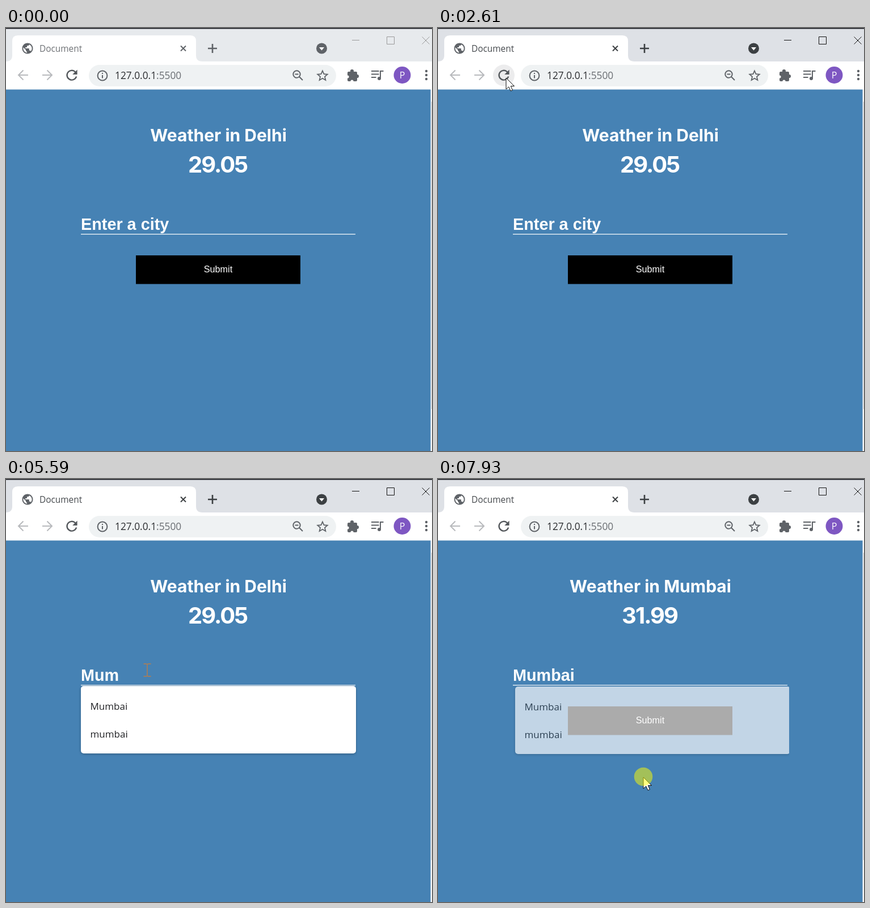
Write an HTML page that moves like this. It is 751 px wide and 746 px high and loops after 8000 ms.

```html
<!DOCTYPE html>
<html lang="en">
<head>
<meta charset="utf-8">
<title>Weather form</title>
<style>
  html, body { margin: 0; width: 100%; height: 100%; overflow: hidden; }
  svg { display: block; width: 751px; height: 746px; }
  svg { --strip: #e7eaed; --ctl: #9a9a9a; --ink: #5f6368; --title: #6e7175; }
  svg.active { --strip: #dee1e6; --ctl: #111; --ink: #3c4043; --title: #45494d; }
  .ui { font-family: "Open Sans", "Noto Sans", sans-serif; }
  .head { font-family: Inter, "Open Sans", sans-serif; font-weight: 700; fill: #fff; text-anchor: middle; }
  .arial { font-family: "Liberation Sans", Arial, sans-serif; }
  .line { fill: none; stroke: #5f6368; stroke-width: 2; }
  .off { display: none; }
  #list text { font-size: 17px; font-weight: 500; fill: #202124; }
  #list .box { filter: drop-shadow(0 1px 2px rgba(0, 0, 0, .3)); }
</style>
</head>
<body>
<svg id="stage" viewBox="0 0 751 746">
  <!-- tab strip -->
  <rect width="751" height="60" fill="var(--strip)"/>
  <rect width="751" height="1.5" fill="#14161c"/>
  <path d="M0 59Q11 59 11 48V23Q11 13 21 13H325Q335 13 335 23V48Q335 59 346 59Z" fill="#fff"/>
  <g id="globe" transform="translate(26.6 24.6) scale(.95)">
    <path fill="#5f6368" d="M12 2C6.48 2 2 6.48 2 12s4.48 10 10 10 10-4.48 10-10S17.52 2 12 2zm-1 17.93c-3.95-.49-7-3.85-7-7.93 0-.62.08-1.21.21-1.79L9 15v1c0 1.1.9 2 2 2zm6.9-2.54c-.26-.81-1-1.39-1.9-1.39h-1v-3c0-.55-.45-1-1-1H8v-2h2c.55 0 1-.45 1-1V7h2c1.1 0 2-.9 2-2v-.41c2.93 1.19 5 4.06 5 7.41 0 2.08-.8 3.97-2.1 5.39z"/>
  </g>
  <path id="spinner" d="M33 29Q35.5 27 39 27" fill="none" stroke="#b9c3de" stroke-width="2"/>
  <text class="ui" x="59" y="41.5" font-size="15.4" fill="var(--title)">Document</text>
  <path d="M308 31.5l9 9m0-9l-9 9" stroke="var(--ink)" stroke-width="2"/>
  <path d="M356 36h16m-8-8v16" stroke="var(--ink)" stroke-width="2.6"/>
  <circle cx="556.5" cy="36" r="9.5" fill="var(--ink)"/>
  <path d="M552 34h9l-4.5 5.5z" fill="#fff"/>
  <path d="M610 21.5h13M671.5 15.5h13v13h-13zM733.5 15.5l13 13m0-13l-13 13" fill="none" stroke="var(--ctl)"/>

  <!-- toolbar -->
  <rect y="59" width="751" height="50" fill="#fff"/>
  <circle id="halo" cx="116" cy="83.5" r="19"/>
  <g class="line" style="stroke:#b8babd">
    <path d="M39 83H22m8.5-8.5L22 83l8.5 8.5"/>
    <path d="M64 83h17m-8.5-8.5L81 83l-8.5 8.5"/>
  </g>
  <path transform="translate(101.6 68.8) scale(1.2)" fill="#54585c" d="M17.65 6.35A8 8 0 1 0 19.73 14h-2.08A6 6 0 1 1 12 6c1.66 0 3.14.69 4.22 1.78L13 11h7V4z"/>
  <rect x="146" y="65" width="436" height="38" rx="19" fill="#eff2f3"/>
  <g class="line">
    <circle cx="170" cy="84" r="8.4"/>
    <path d="M170 83v5.5m0-9.5v2"/>
    <circle cx="512.5" cy="81.5" r="6.2"/>
    <path d="M517 86l6 6M509.5 81.5h6"/>
    <path d="M558 75.500l2.500 5.700 6.200.6-4.700 4.100 1.400 6.100-5.400-3.200-5.400 3.200 1.400-6.100-4.700-4.100 6.200-.6z" stroke-width="1.8"/>
    <path d="M644 76h13.500m-13.500 5.500h13.500m-13.500 5.500h8.500M660 89V76h5.500"/>
  </g>
  <circle cx="658" cy="89" r="3" fill="#5f6368"/>
  <text class="ui" x="192" y="90" font-size="17.3" fill="#2b2d30">127.0.0.1<tspan fill="#6a6e73">:5500</tspan></text>
  <g fill="#5f6368">
    <rect x="602" y="77" width="17" height="17" rx="2"/>
    <circle cx="610" cy="76" r="3.100"/>
    <circle cx="619" cy="85" r="3.100"/>
    <circle cx="602" cy="86" r="2.600" fill="#fff"/>
    <circle cx="610" cy="94" r="2.600" fill="#fff"/>
    <circle cx="741" cy="76" r="2.200"/>
    <circle cx="741" cy="83" r="2.200"/>
    <circle cx="741" cy="90" r="2.200"/>
  </g>
  <circle cx="698.500" cy="83" r="15" fill="#7e57c2"/>
  <text class="ui" x="698.500" y="89" font-size="16" fill="#fff" text-anchor="middle">P</text>

  <!-- page -->
  <rect y="108.500" width="751" height="638" fill="#f4f5f6"/>
  <rect y="108.500" width="748.500" height="638" fill="#4682b4"/>
  <path d="M750.500 130V672" stroke="#c4c6c8"/>
  <g id="page">
    <text id="heading" class="head" x="374.500" y="200" font-size="30"></text>
    <text id="temp" class="head" x="373" y="254.500" font-size="40" letter-spacing="-2"></text>
    <rect x="132" y="363" width="484" height="1.200" fill="#fff"/>
    <text id="value" class="arial" x="132" y="356" font-size="28.800" font-weight="700" fill="#fff"></text>
    <rect id="caret" y="330" width="1" height="33" fill="#fff"/>
    <g id="preview">
      <rect x="132" y="330.500" width="484" height="34" fill="#e8f0fe"/>
      <text class="arial" x="132" y="356" font-size="16" fill="#111">mumbai</text>
    </g>
    <rect x="229" y="401" width="290" height="50.500"/>
    <text class="arial" x="374" y="431" font-size="16.200" fill="#fff" text-anchor="middle">Submit</text>
  </g>
  <clipPath id="edge"><rect x="120" y="360" width="499" height="330"/></clipPath>
  <g clip-path="url(#edge)"><g id="list" class="ui"></g></g>

  <!-- pointer -->
  <path id="arrow" d="M0 0V20L4.800 15.800 8 23 11.400 21.500 8.300 14.500H14.500Z" fill="#fff" stroke="#111"/>
  <path id="beam" d="M-6.500-11H-1.500L0-10 1.500-11H6.500M0-10V10M-6.500 11H-1.500L0 10 1.500 11H6.500" fill="none" stroke="#b97d4b" stroke-width="1.400"/>
  <circle id="dot" r="16.300" fill="#ff0" fill-opacity=".5"/>
</svg>
<script>
const LOOP = 8000;
const $ = id => document.getElementById(id);
const all = ["Mumbai", "Delhi", "mumbai", "adwdqwa", "adwdaw", "sfwefwef"];
const matches = ["Mumbai", "mumbai"];

// Each step changes only the named parts of the state.
const start = {
  active: false, arrow: null, beam: null, dot: null, halo: "none", loading: false, page: true,
  city: "Delhi", temp: "29.05", value: "Enter a city", caret: false, preview: false,
  list: null, fade: false, row: -1
};
const steps = [
  [270, { arrow: [558, 580] }],
  [430, { arrow: [470, 470] }],
  [590, { arrow: null, beam: [236, 337] }],
  [1050, { arrow: [225, 300], beam: null }],
  [1200, { arrow: [200, 230] }],
  [1360, { arrow: [165, 150] }],
  [1510, { arrow: [135, 105], halo: "#f1f1f2" }],
  [1670, { arrow: [120, 88], halo: "#ececed" }],
  [1820, { active: true, dot: [120, 87], halo: "#e2e3e4" }],
  [1980, { halo: "#dadbdc" }],
  [2130, { dot: null, loading: true }],
  [2290, { page: false }],
  [2450, { page: true, loading: false, halo: "#e2e3e4" }],
  [2610, { halo: "#ececed" }],
  [2780, { arrow: [150, 140], halo: "none" }],
  [2930, { arrow: [205, 240] }],
  [3080, { arrow: [245, 312] }],
  [3250, { arrow: null, beam: [249, 337] }],
  [3400, { dot: [246, 336], caret: true }],
  [3560, { list: all, fade: true }],
  [3710, { fade: false }],
  [3860, { dot: null }],
  [4180, { value: "M", fade: true }],
  [4350, { list: matches, fade: false }],
  [4640, { value: "Mu" }],
  [4960, { value: "Mum" }],
  [5590, { caret: false }],
  [6050, { value: "Mumb", caret: true }],
  [6200, { value: "Mumba" }],
  [6370, { value: "Mumbai" }],
  [6850, { caret: false, city: "Mumbai", temp: "31.99" }],
  [7480, { beam: null, arrow: [324, 471], preview: true, row: 1 }],
  [7630, { arrow: [345, 500], preview: false, row: -1 }],
  [7780, { arrow: [362, 526], dot: [362, 525] }],
  [7930, { fade: true }]
];

const show = (id, on) => $(id).classList.toggle("off", !on);

function place(id, at) {
  show(id, at);
  if (at) $(id).setAttribute("transform", `translate(${at})`);
}

function drawList({ list, fade, row }) {
  show("list", list);
  if (!list) return;
  const rowH = 48.6, top = 376;
  const hover = row < 0 ? "" :
    `<rect x="132" y="${top + row * rowH}" width="485" height="${rowH}" fill="#e7e8e7"/>`;
  const items = list.map((name, i) => `<text x="148.5" y="${407 + i * rowH}">${name}</text>`);
  $("list").innerHTML =
    `<rect class="box" x="132" y="365" width="485" height="${list.length * rowH + 21.8}" rx="5" fill="#fff"/>` +
    hover + items.join("");
  $("list").setAttribute("opacity", fade ? 0.67 : 1);
  $("list").setAttribute("transform", fade ? "translate(4 1)" : "");
}

function draw(s) {
  $("stage").classList.toggle("active", s.active);
  $("halo").setAttribute("fill", s.halo);
  show("globe", !s.loading);
  show("spinner", s.loading);
  show("page", s.page);
  $("heading").textContent = "Weather in " + s.city;
  $("temp").textContent = s.temp;
  $("value").textContent = s.value;
  show("value", !s.preview);
  show("preview", s.preview);
  show("caret", s.caret);
  const typed = s.value === start.value ? 0 : $("value").getComputedTextLength();
  $("caret").setAttribute("x", 132 + Math.floor(typed));
  drawList(s);
  ["arrow", "beam", "dot"].forEach(id => place(id, s[id]));
}

const began = performance.now();
let shown = -1;
function tick() {
  const t = (performance.now() - began) % LOOP;
  const past = steps.filter(([at]) => at <= t);
  if (past.length !== shown) {
    shown = past.length;
    draw(Object.assign({}, start, ...past.map(([, change]) => change)));
  }
  requestAnimationFrame(tick);
}
tick();
</script>
</body>
</html>
```
